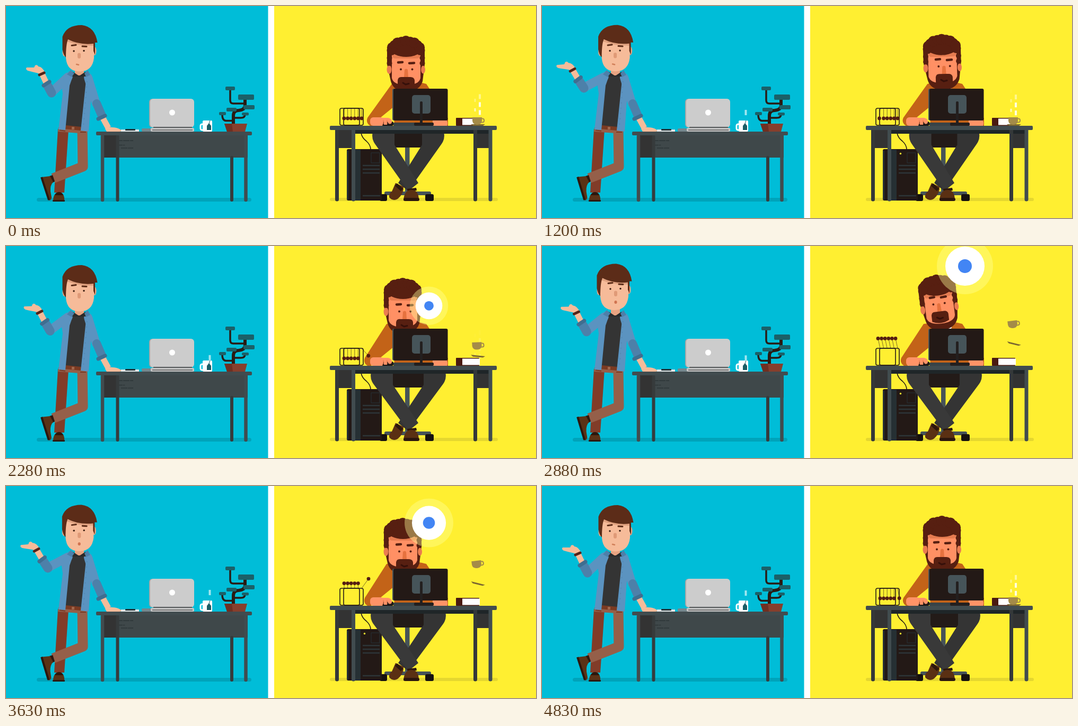
Write an HTML page that moves like this. It is 1000 px wide and 400 px high and loops after 4860 ms.

```html
<!DOCTYPE html>
<html lang="en">
<head>
<meta charset="utf-8">
<title>Two desks</title>
<style>
  html, body { margin: 0; width: 100%; height: 100%; overflow: hidden; }
  svg { display: block; width: 100%; height: 100%; }
  .ln { fill: none; stroke-linejoin: round; }
  .rd { stroke-linecap: round; }
</style>
</head>
<body>
<svg viewBox="0 0 1000 400">
  <rect width="1000" height="400" fill="#fff"/>
  <rect width="494.500" height="400" fill="#00bdd8"/>
  <rect x="506" width="494" height="400" fill="#ffef31"/>
  <rect x="58" y="362" width="405" height="7" rx="3.5" fill="#00a3ba"/>
  <rect x="611" y="362" width="317" height="6" rx="3" fill="#e5d72f"/>

  <!-- standing man: legs -->
  <path d="M98 232H118L110 352H91Z" fill="#813c28"/>
  <path d="M89 368Q89 352 100 352T110 368Z" fill="#5a3216"/>
  <path d="M92 357Q94 351 100 351T108 357Z" fill="#2c170d"/>
  <rect x="88" y="366" width="23" height="3" rx="1" fill="#2c170d"/>
  <path class="ln" d="M144 234L145 303L89 325" stroke="#955f49" stroke-width="19"/>
  <path d="M99 229L154 232L152 241L98 237Z" fill="#955f49"/>
  <path class="ln" d="M101 234L112 236M140 238L151 238" stroke="#7a3b26" stroke-width="2"/>
  <g id="shoe">
    <path d="M82 321L88 319L92 331L87 334Z" fill="#2c170d"/>
    <path d="M67 323L83 321L89 332Q83 338 84 350L86 361Q86 366 81 367Z" fill="#5a3216"/>
    <path class="ln" d="M67 323L81 366" stroke="#2c170d" stroke-width="4"/>
  </g>

  <!-- standing man: torso -->
  <path d="M120 130H153L142 230L112 227Z" fill="#343434"/>
  <path d="M113 225L142 228L141 235L111 232Z" fill="#7a3a22"/>
  <rect x="124" y="228" width="5" height="5" fill="#a0674c"/>
  <path id="sleeve" class="ln rd" stroke="#5b93c0" stroke-width="17"/>
  <path d="M119 123L127 130L120 150L112 234L99 233L107 165L104 145Z" fill="#5b93c0"/>
  <path class="ln rd" d="M155 135L170 184" stroke="#5b93c0" stroke-width="16"/>
  <path d="M153 123L161 130L160 180L156 237L141 235L151 140Z" fill="#5b93c0"/>
  <path class="ln" d="M153 142L146 230" stroke="#4d80aa" stroke-dasharray="2 8"/>
  <path d="M130 116H147V131H130Z" fill="#e8a482"/>
  <path d="M126 124L138 132L150 124L153 133H122Z" fill="#2a2a2a"/>
  <path d="M122 121L129 127L124 134L115 129ZM154 121L148 127L151 134L159 130Z" fill="#4d80aa"/>
  <path class="ln" d="M182 210L193 230" stroke="#f6bb99" stroke-width="11"/>
  <path class="ln rd" d="M171 184L180 205" stroke="#4d80a9" stroke-width="16"/>
  <path class="ln rd" d="M174 213L187 207" stroke="#3f6e90" stroke-width="7"/>
  <g id="forearm">
    <path class="ln" d="M76 145L66 124" stroke="#f6bb99" stroke-width="11"/>
    <path d="M61 127Q48 124 41 122Q36 119 39 116L53 116L55 112Q59 110 61 114Q69 115 73 125Z" fill="#f6bb99"/>
    <path class="ln rd" d="M63 130L72 126" stroke="#54241a" stroke-width="5"/>
    <path class="ln rd" d="M86 164L79 151" stroke="#4d80a9" stroke-width="17"/>
    <path class="ln rd" d="M71 150L82 143" stroke="#3f6e90" stroke-width="7"/>
  </g>

  <!-- standing man: head -->
  <g id="head1">
    <ellipse cx="110.500" cy="87" rx="4" ry="8" fill="#eca683"/>
    <ellipse cx="167" cy="85" rx="3.500" ry="8" fill="#eca683"/>
    <path d="M113 60H166V98Q163 123.500 139 123.500T113 98Z" fill="#f6bb99"/>
    <path d="M115 64L166 68V75Q139 76 115 67Z" fill="#dfa07e"/>
    <path d="M106.500 82V58Q114 36 143 36Q168 39 172.500 69H168V92L165 85V71Q139 74 117 63Q113 72 113 97Q108 92 106.500 82Z" fill="#5c2c18"/>
    <g id="face1">
      <path class="ln rd" d="M124 74.500L132 73.500M144 76L152 76.500" stroke="#5c2c18" stroke-width="3"/>
      <circle cx="128" cy="85" r="1.700" fill="#3a1c10"/>
      <circle cx="147" cy="84.500" r="1.700" fill="#3a1c10"/>
      <path d="M135 90Q138 87 141 90V96Q141 99 138 99T135 96Z" fill="#e09a77"/>
      <path id="line" class="ln rd" d="M133 110L137 111" stroke="#d07f59" stroke-width="2.500"/>
      <ellipse id="oh" cx="138" cy="110" rx="2.600" ry="3" fill="#d07350"/>
    </g>
  </g>

  <!-- left desk -->
  <rect x="185" y="243" width="271" height="43" fill="#3f484a"/>
  <rect x="185" y="243" width="23" height="43" fill="#333"/>
  <path class="ln" d="M208 254H240M208 262.500H224M217 268H240" stroke="#2e3638" stroke-width="1.500" stroke-dasharray="12 1"/>
  <path class="ln rd" d="M210.500 246V366M426 286V366" stroke="#363b3c" stroke-width="6"/>
  <path class="ln rd" d="M182 246V366M452.500 246V366" stroke="#414c4f" stroke-width="6.500"/>
  <rect x="170" y="237" width="294" height="7" rx="2" fill="#414c4f"/>
  <path d="M187 232Q192 227 201 229Q209 229 216 233Q220 237 214 237H190Z" fill="#f6bb99"/>
  <rect x="217" y="233" width="34" height="4" fill="#dfe6e8"/>
  <rect x="225" y="232" width="19" height="3" rx="1" fill="#24353b"/>
  <rect x="256" y="231" width="20" height="6" rx="2" fill="#76878d"/>
  <rect x="270" y="175" width="80" height="54" rx="6" fill="#a8a8a8"/>
  <rect x="272" y="175" width="83" height="54" rx="6" fill="#ccc"/>
  <rect x="278" y="228" width="73" height="3" fill="#54585a"/>
  <rect x="273" y="230" width="82" height="7" rx="2" fill="#c4c4c4"/>
  <rect x="276" y="233" width="76" height="2" fill="#777"/>
  <circle cx="313.500" cy="201" r="5.500" fill="#fff"/>
  <rect id="tea" x="382.500" y="-5" width="4" height="10" fill="#c9f2f7"/>
  <rect x="367" y="223" width="8" height="11" rx="3" class="ln" stroke="#fff" stroke-width="3"/>
  <rect x="371" y="216" width="18" height="21" rx="2" fill="#fff"/>
  <path d="M379 226L383 221L387 226V234H379Z" fill="#1b5d65"/>
  <path class="ln" d="M383 222L385 216" stroke="#1b5d65"/>

  <!-- plant -->
  <g class="ln" stroke="#2a1b14">
    <path d="M429 224V207Q429 197 439 197Q451 196 451 187V174" stroke-width="6"/>
    <path d="M450 184H429Q423 184 423 178V157M429 216.500H415Q408 216 408 205M431 211H443Q451 211 451 204" stroke-width="3.500"/>
  </g>
  <g fill="#1b6068">
    <rect x="414" y="152" width="18" height="7" rx="2"/>
    <rect x="438" y="167" width="30" height="10" rx="2"/>
    <rect x="448" y="187" width="21" height="8" rx="2"/>
    <rect x="416" y="192" width="19" height="7" rx="2"/>
    <rect x="402" y="200" width="13" height="6" rx="2"/>
    <rect x="445" y="201" width="13" height="5.500" rx="2"/>
  </g>
  <path d="M412 222H455L451 237H417Z" fill="#873f2d"/>
  <path d="M412 222H426L428 237H417Z" fill="#6f3022"/>

  <!-- chair -->
  <rect x="753" y="262" width="8.500" height="92" fill="#465358"/>
  <rect x="714" y="350" width="88" height="7" rx="3" fill="#465358"/>
  <rect x="705" y="355" width="14" height="13" rx="3" fill="#16110f"/>
  <rect x="791" y="355" width="16" height="13" rx="3" fill="#16110f"/>
  <rect x="727" y="236" width="68" height="31" rx="8" fill="#231b18"/>

  <!-- computer tower -->
  <rect x="643" y="270" width="66" height="97" rx="3" fill="#231916"/>
  <path d="M658 271H669V367H658ZM643 273H646V365H643Z" fill="#263034"/>
  <rect x="689" y="277" width="16" height="19" class="ln" stroke="#263238"/>
  <path class="ln" d="M673 301H705M673 308H705M673 315H705M673 358H706" stroke="#2d3538" stroke-width="2.500"/>
  <circle id="led" cx="676.500" cy="278.500" r="1.700" fill="#ffef31"/>
  <path class="ln" d="M670 240Q672 249 680 255Q688 262 688 271" stroke="#231916" stroke-width="1.600"/>

  <!-- seated man -->
  <path id="legR" fill="#343434"/>
  <path d="M735 334L750 341Q751 354 739 364Q730 369 723 361Q722 354 728 350Z" fill="#5a3013"/>
  <path class="ln" d="M736 337L747 347" stroke="#2c170d" stroke-width="6"/>
  <path id="legL" fill="#393939"/>
  <path d="M757 345L774 343L775 348L758 351Z" fill="#2c170d"/>
  <path d="M750 367Q751 347 765 347T779 367Z" fill="#5a3013"/>
  <rect x="750" y="362" width="30" height="6" rx="3" fill="#2c170d"/>
  <path d="M728 147Q760 138 793 147L815 180L834 212V226H733Z" fill="#c36318"/>
  <path d="M747 144H776L770 162H753Z" fill="#fff"/>
  <path id="arm" fill="#c36318"/>
  <g id="head2">
    <path d="M719 84H790V110L786 142Q780 161 755 162Q731 161 726 142L719 110Z" fill="#571f11"/>
    <ellipse cx="723" cy="120" rx="4.500" ry="8" fill="#ea7c50"/>
    <ellipse cx="787" cy="120" rx="4" ry="7.500" fill="#ea7c50"/>
    <path d="M728 84H782V136Q779 149 755 149T728 136Z" fill="#ff9064"/>
    <rect x="729" y="88" width="52" height="11" rx="5" fill="#e57b50"/>
    <g id="curls" fill="#571f11"><ellipse cx="755" cy="80" rx="30" ry="16"/></g>
    <g id="face2">
      <path class="ln rd" d="M740 106.500L748 106M761 108L770 107.500" stroke="#571f11" stroke-width="4.500"/>
      <circle cx="745" cy="119.500" r="2" fill="#571f11"/>
      <circle cx="766.500" cy="119.500" r="2" fill="#571f11"/>
      <path d="M752 120Q755 117 758 120L759 134H751Z" fill="#e6723f"/>
      <path d="M739 140Q740 133 747 134H763Q770 134 771 140V152Q755 160 739 152Z" fill="#571f11"/>
      <path class="ln rd" d="M749 145L754 148L760 146.500" stroke="#35100a" stroke-width="3"/>
    </g>
  </g>

  <g id="bubble">
    <circle r="53" fill="#ff9" fill-opacity=".4"/>
    <circle r="37" fill="#fff"/>
    <circle r="13" fill="#4285f4"/>
  </g>

  <!-- right desk -->
  <path d="M625 234H656V268H625ZM888 234H913V268H888Z" fill="#333"/>
  <rect x="656" y="233" width="256" height="8" fill="#1f2628"/>
  <path class="ln rd" d="M624.500 234V365M885.500 234V365" stroke="#343839" stroke-width="7"/>
  <path class="ln rd" d="M655.500 234V365M914 234V365" stroke="#414c4f" stroke-width="7"/>
  <rect x="611" y="226" width="315" height="8" rx="2" fill="#414c4f"/>
  <rect x="687" y="210" width="26" height="16" rx="6" fill="#ff9367"/>
  <rect x="708" y="218" width="23" height="8" rx="3" fill="#1d1816"/>
  <path d="M702 211H721Q728 212 728 219Q727 224 722 222L719 217V224H713V217L710 226H702Z" fill="#ff9367"/>
  <path class="ln" d="M719 223V215M712 223V215" stroke="#e5764a"/>
  <path d="M805 214H830Q835 219 832 226H805Z" fill="#ff9367"/>
  <rect x="731" y="220" width="42" height="6" rx="1" fill="#384347"/>
  <rect x="729" y="156" width="20" height="60" rx="3" fill="#465358"/>
  <rect x="731" y="156" width="102.500" height="60" rx="3" fill="#231916"/>
  <rect x="766" y="168" width="35" height="35" rx="5" fill="#465459"/>
  <rect x="781" y="180" width="5" height="43" rx="2" fill="#231f1f"/>
  <rect x="770" y="220" width="37" height="6" rx="2" fill="#231f1f"/>
  <g class="ln" stroke="#231916" stroke-width="1.600">
    <rect x="630" y="193" width="37" height="32" rx="3"/>
    <rect x="637" y="193" width="37" height="32" rx="3"/>
    <path id="strings" stroke-width=".6"/>
  </g>
  <g id="balls" fill="#541d12"></g>
  <rect x="849" y="211" width="44" height="15" rx="1" fill="#4a1a10"/>
  <rect x="861" y="212.500" width="33" height="12" fill="#fff"/>
  <g id="steam" fill="#fffde0"></g>
  <path id="saucer" d="M877 223H904L900 226H881Z" fill="#7c6730"/>
  <g id="cup">
    <rect x="893" y="212.500" width="9" height="7" rx="3" class="ln" stroke="#a48b48" stroke-width="2"/>
    <path d="M880 210H898V217Q897 224 889 224T880 217Z" fill="#a48b48"/>
  </g>
</svg>
<script>
const LOOP = 4860;
const PUFF = LOOP / 16;
const MOUTH = '-o-oo -o-o';

const $ = id => document.getElementById(id);
const put = (id, name, value) => $(id).setAttribute(name, value);
const move = (id, x, y, more = '') => put(id, 'transform', `translate(${x} ${y}) ${more}`);
const set = (el, attrs) => { for (const k in attrs) el.setAttribute(k, attrs[k]); };

const clamp = x => Math.min(1, Math.max(0, x));
const part = (t, from, length) => clamp((t - from) / length);
const smooth = p => p * p * (3 - 2 * p);
const easeOut = p => 1 - (1 - p) ** 3;
const easeIn = p => p ** 3;
// 0 → 1 after `from`, back to 0 by `to`
const pulse = (t, from, to, fade = 230) =>
  smooth(part(t, from, fade)) - smooth(part(t, to - fade, fade));

function add(id, tag, n) {
  const list = Array.from({ length: n }, () => document.createElementNS('http://www.w3.org/2000/svg', tag));
  $(id).append(...list);
  return list;
}

// An arch of curls over the forehead
add('curls', 'circle', 11).forEach((c, i) => {
  const a = Math.PI * i / 10;
  set(c, { cx: 754.5 - 27 * Math.cos(a), cy: 84 - 18 * Math.sin(a), r: 9 + i % 2 });
});
// Two more down each side
add('curls', 'circle', 4).forEach((c, i) =>
  set(c, { cx: 754.5 + (i % 2 ? 31 : -31), cy: i < 2 ? 98 : 108, r: 5 }));
const balls = add('balls', 'circle', 6);
const puffs = add('steam', 'rect', 7);

function standing(t) {
  const arm = .25 * pulse(t, 0, 4800) + .75 * (pulse(t, 850, 2350) + pulse(t, 3300, 4650));
  const nod = pulse(t, 450, 1250) + pulse(t, 2450, 3700);
  const dx = -7 * arm, dy = -9 * arm;
  put('sleeve', 'd', `M117 134L${86 + dx} ${163 + dy}`);
  move('forearm', dx, dy, `rotate(${-5 * arm} 86 163)`);
  move('head1', -3 * nod, -2.5 * nod);
  move('face1', 4 * nod, -1.5 * nod);
  put('shoe', 'transform', `rotate(${nod + arm} 88 328)`);
  const mouth = MOUTH[Math.floor(t / 150) % MOUTH.length];
  put('line', 'opacity', +(mouth == '-'));
  put('oh', 'opacity', +(mouth == 'o'));
}

// side: -1 for the left knee, 1 for the right; both shins cross in the middle
function leg(side, spread) {
  const x = (d, k = spread) => 759 + side * (d + k);
  return `M${x(67)} 238Q${x(70)} 250 ${x(63)} 260L${x(0, 0)} 349L${x(-19, 0)} 334L${x(26)} 262V238Z`;
}

function seated(t) {
  const look = pulse(t, 500, 1300), work = pulse(t, 1150, 2250);
  const lean = pulse(t, 2060, 4500), awe = pulse(t, 2450, 3550);
  move('head2', 3 * look + 5 * work - 6 * lean + 5 * awe, -9 * look + work + 4 * lean - 7 * awe,
    `rotate(${-4 * look - 7 * awe} 756 150)`);
  move('face2', 6 * look + 3 * lean - 4 * awe, -6 * look - 8 * awe);
  const spread = 3 * lean - 4 * look, elbow = awe - 3 * work - 5 * lean;
  put('legL', 'd', leg(-1, spread));
  put('legR', 'd', leg(1, spread));
  const e = 682 + elbow;
  put('arm', 'd', `M${728 + 2 * elbow} 147L${e} 211Q${e - 4} 220 ${e + 5} 226H${e + 12}L690 211H706L738 185V145Z`);
}

function cradle(t) {
  const flip = 1 - 2 * pulse(t, 2310, 3900, 400);
  const tilt = -4 * pulse(t, 2600, 3500), kick = pulse(t, 3450, 3850, 180);
  const swing = -14 * Math.sin(Math.PI * t / 405) * Math.max(flip, 0);
  let d = '';
  balls.forEach((b, i) => {
    const out = i == 0 ? Math.min(swing, 0) : i == 5 ? Math.max(swing, 0) + 13 * kick : 0;
    const dx = tilt + out, x = 638 + 6.6 * i;
    const y = 193 + (i == 5 ? flip - .8 * kick : flip) * Math.sqrt(19 * 19 - dx * dx);
    set(b, { cx: x + dx, cy: y, r: 3.4 });
    d += `M${x} 193L${x + dx} ${y}`;
  });
  put('strings', 'd', d);
}

function floating(t) {
  const b = easeOut(part(t, 2180, 480)) * (1 - easeIn(part(t, 3400, 390)));
  move('bubble', 798, 190 - 152 * b, `scale(${.36 + .64 * b})`);
  const up = easeOut(part(t, 2200, 500)) * (1 - easeIn(part(t, 4250, 200)));
  move('cup', -up, -69 * up, `rotate(${-7 * up} 889 217)`);
  move('saucer', 0, -40 * up, `rotate(${14 * up} 890 224)`);
}

function steam(t) {
  const p = t / PUFF % 1;
  move('tea', 0, 222 - 22 * p);
  put('tea', 'opacity', Math.min(.8, 3 * p));
  put('steam', 'opacity', 1 - pulse(t, 2150, 4600, 180));
  puffs.forEach((r, i) => {
    const right = i < 4, h = right ? 9 : 6;
    const y = right ? 216 - 15 * (i + p) : 214 - 18 * (i - 4 + p);
    set(r, { x: right ? 892 : 883.5, y: y - h / 2, width: right ? 4 : 3, height: h,
      opacity: clamp((y - 158) / (right ? 25 : 50)) });
  });
}

function draw(now) {
  const t = now % LOOP;
  standing(t);
  seated(t);
  cradle(t);
  floating(t);
  steam(t);
  put('led', 'opacity', +(t / 324 % 1 > .15));
  requestAnimationFrame(draw);
}
draw(performance.now());
</script>
</body>
</html>
```
